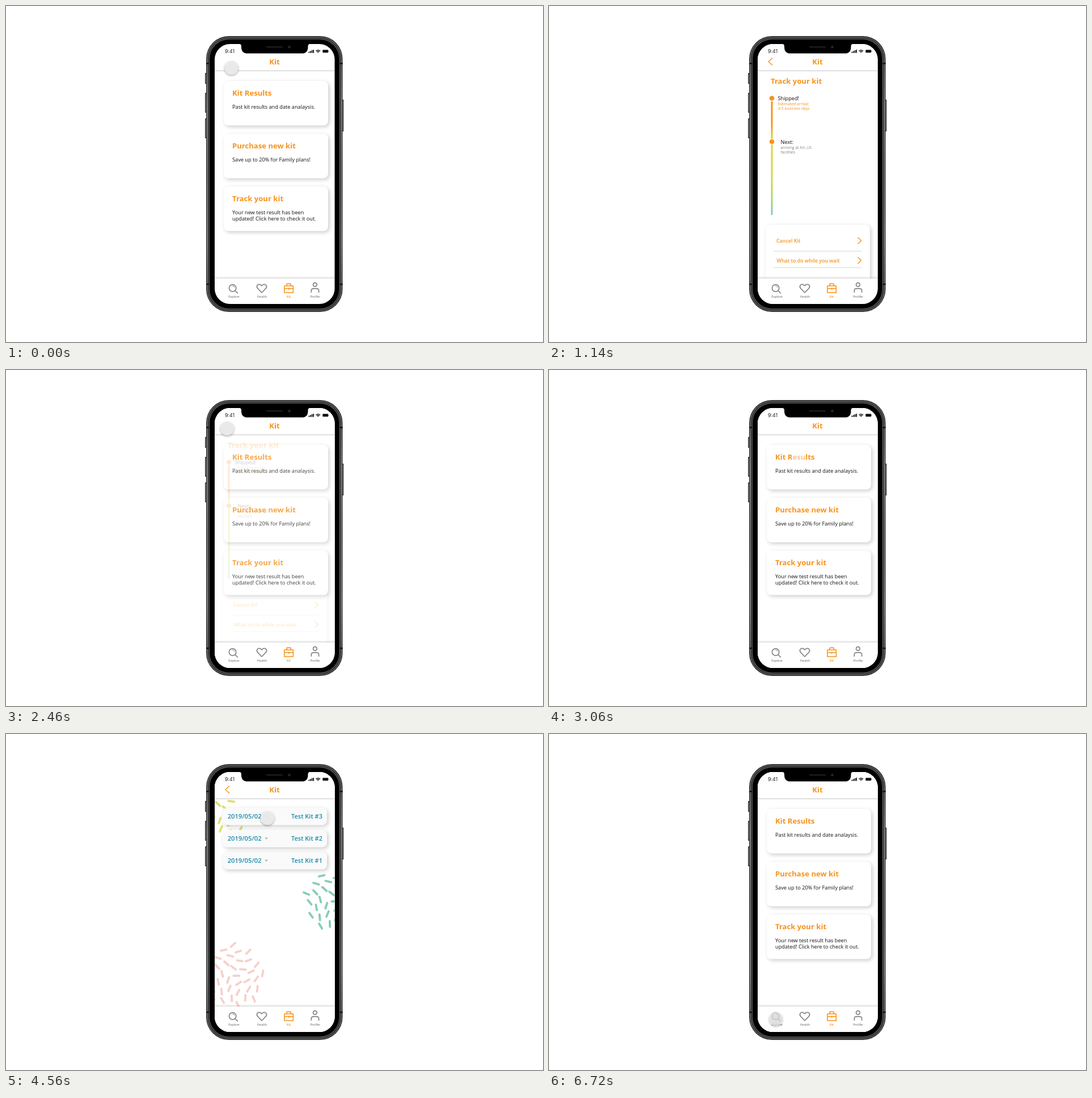
An HTML page with a canvas for the animation above (6.82 s loop, 947 by 592 pixels).

```html
<!DOCTYPE html>
<html lang="en">
<head>
<meta charset="utf-8">
<title>Kit app</title>
<style>
html, body { margin: 0; width: 100%; height: 100%; overflow: hidden; background: #fff; }
canvas { display: block; }
</style>
</head>
<body>
<canvas id="stage" width="947" height="592"></canvas>
<script>
(() => {
const W = 947, H = 592, LOOP = 6820, STEP = 60, LAST = 6720;
const ORANGE = '#f7931e', GRAY = '#858585', TEAL = '#2088a8', INK = '#111';
const FONT = '"Open Sans", "Noto Sans", sans-serif';
const stage = document.getElementById('stage').getContext('2d');
const clamp = v => Math.max(0, Math.min(1, v));

function layer(paint) {
  const c = document.createElement('canvas');
  c.width = W;
  c.height = H;
  paint(c.getContext('2d'));
  return c;
}

function box(g, x, y, r, b, radius, fill) {
  g.beginPath();
  g.roundRect(x, y, r - x, b - y, radius);
  g.fillStyle = fill;
  g.fill();
}

function line(g, pts, color, width) {
  g.beginPath();
  pts.forEach(([x, y]) => g.lineTo(x, y));
  g.strokeStyle = color;
  g.lineWidth = width;
  g.stroke();
}

function dot(g, x, y, r, fill) {
  g.beginPath();
  g.arc(x, y, r, 0, 7);
  g.fillStyle = fill;
  g.fill();
}

function text(g, str, x, y, size, color, weight = 400, align = 'left', family = FONT) {
  g.font = `${weight} ${size}px ${family}`;
  g.textAlign = align;
  g.fillStyle = color;
  g.fillText(str, x, y);
}

function shadow(g, color, blur, x, y) {
  g.shadowColor = color;
  g.shadowBlur = blur;
  g.shadowOffsetX = x;
  g.shadowOffsetY = y;
}

function card(g, x, y, r, b, fill = '#fff') {
  g.save();
  shadow(g, 'rgba(0,0,0,.2)', 7, 2.5, 2.5);
  box(g, x, y, r, b, 8, fill);
  g.restore();
}

function ramp(g, y0, y1, ...colors) {
  const grad = g.createLinearGradient(0, y0, 0, y1);
  colors.forEach((c, i) => grad.addColorStop(i / (colors.length - 1), c));
  return grad;
}

// Short strokes spread evenly over a disc in a sunflower spiral.
function confetti(g, cx, cy, count, color) {
  g.lineCap = 'round';
  for (let i = 0; i < count; i++) {
    const r = 9 * Math.sqrt(i + .5), turn = i * 2.4, tilt = i * 1.9;
    const x = cx + r * Math.cos(turn), y = cy + r * Math.sin(turn);
    const dx = 5 * Math.cos(tilt), dy = 5 * Math.sin(tilt);
    line(g, [[x - dx, y - dy], [x + dx, y + dy]], color, 3.8);
  }
  g.lineCap = 'butt';
}

function homeBody(g) {
  [['Kit Results', 'Past kit results and date analaysis.'],
   ['Purchase new kit', 'Save up to 20% for Family plans!'],
   ['Track your kit', 'Your new test result has been', 'updated! Click here to check it out.']
  ].forEach(([title, ...body], i) => {
    const y = 132 + i * 93;
    card(g, 384, y, 568, y + 78.5);
    text(g, title, 399, y + 25.5, 13.1, ORANGE, 700);
    body.forEach((s, n) => text(g, s, 399, y + 48.7 + n * 11, 9.2, INK));
  });
}

function trackBody(g) {
  text(g, 'Track your kit', 391, 137, 13.1, ORANGE, 700);
  line(g, [[393, 168], [393, 234]], ramp(g, 210, 234, ORANGE, '#e0d634'), 3);
  line(g, [[393, 244], [393, 368]], ramp(g, 244, 368, '#e0d634', '#d3dc3f', '#b9d860', '#7fcbc0'), 3);
  dot(g, 393, 162.5, 4.3, ORANGE);
  dot(g, 393, 239, 4.3, ORANGE);
  text(g, 'Shipped!', 403.5, 166.3, 9.2, INK);
  text(g, 'Estimated arrival:', 403.7, 175, 6.8, ORANGE);
  text(g, '4-5 business days', 403.7, 183.4, 6.8, ORANGE);
  text(g, 'Next:', 408.5, 243, 9.2, INK);
  text(g, 'arriving at NY, US', 408.5, 251.5, 6.8, GRAY);
  text(g, 'facilities', 408.5, 260, 6.8, GRAY);
  card(g, 382, 385.5, 566, 520);
  text(g, 'Cancel Kit', 401, 416.6, 8.9, ORANGE, 600);
  text(g, 'What to do while you wait', 401.5, 451.6, 8.9, ORANGE, 600);
  [[432, 413.5], [461, 448.3]].forEach(([y, mid]) => {
    line(g, [[396, y], [551.5, y]], '#d4d4d4', 1);
    line(g, [[544.5, mid - 6], [550.5, mid], [544.5, mid + 6]], ORANGE, 1.4);
  });
}

function resultsBody(g) {
  confetti(g, 385, 145, 18, '#dbe070');
  confetti(g, 573, 295, 30, '#88cdb2');
  confetti(g, 400, 426, 38, '#f8cfca');
  for (let i = 0; i < 3; i++) {
    const y = 130 + i * 39;
    card(g, 382, y, 566, y + 30.5, '#fafafa');
    text(g, '2019/05/02', 390.7, y + 19.3, 11.2, TEAL, 600);
    text(g, `Test Kit #${3 - i}`, 558, y + 19.3, 11, TEAL, 600, 'right');
    g.fillStyle = '#b5b5b5';
    g.fill(new Path2D(`M456.3 ${y + 13.5}h5.7l-2.9 3.5z`));
  }
}

function header(g, back) {
  g.save();
  shadow(g, 'rgba(0,0,0,.22)', 3, 0, 1);
  box(g, 360, 60, 590, 113, 0, '#fff');
  g.restore();
  text(g, 'Kit', 473.5, 102.6, 13.1, ORANGE, 700, 'center');
  if (back) line(g, [[394, 91.5], [387, 98], [394, 104.5]], ORANGE, 1.4);
  text(g, '9:41', 386, 82.6, 8.8, '#222', 400, 'left', 'Inter, "Liberation Sans", sans-serif');
  for (let i = 0; i < 4; i++) box(g, 533.5 + i * 2.6, 80.5 - i * 1.2, 535.3 + i * 2.6, 82.7, .4, '#111');
  g.strokeStyle = '#111';
  g.lineWidth = 1.3;
  for (let r = 1.3; r < 6; r += 2) {
    g.beginPath();
    g.arc(550.3, 83, r, -Math.PI * .75, -Math.PI * .25);
    g.stroke();
  }
  box(g, 558.3, 77.2, 568.3, 82.3, 1.2, '#111');
  box(g, 568.8, 78.8, 569.6, 80.7, .4, '#777');
}

function tabs(g) {
  g.save();
  shadow(g, 'rgba(0,0,0,.22)', 3, 0, -1);
  box(g, 360, 480, 590, 530, 0, '#fff');
  g.restore();
  const path = d => g.stroke(new Path2D(d));
  g.strokeStyle = GRAY;
  g.lineWidth = 1.7;
  g.lineCap = g.lineJoin = 'round';
  path('M405.8 497a6.2 6.2 0 1 1-12.4 0a6.2 6.2 0 1 1 12.4 0M404.2 501.6L408.4 506');
  path('M451 505L443.9 497.6C440.6 494 443.5 490.3 446.5 490.3C448.8 490.3 450 491.7 451 493C452 491.7 453.2 490.3 455.5 490.3C458.5 490.3 461.4 494 458.1 497.6Z');
  path('M548.2 491a3.3 3.3 0 1 1-6.6 0a3.3 3.3 0 1 1 6.6 0M538.4 504.2V501.5Q538.4 497.8 542.2 497.8H547.8Q551.6 497.8 551.6 501.5V504.2');
  g.lineWidth = .9;
  path('M399.5 493a4 4 0 0 1 3.6 3');
  g.strokeStyle = ORANGE;
  g.lineWidth = 1.6;
  g.lineJoin = 'miter';
  path('M491 493.2H506.4V505H491ZM495 492.5V490.6Q495 489.4 496.2 489.4H501.2Q502.4 489.4 502.4 490.6V492.5M491 497.8H506.4M498.7 497.8V499.6');
  g.lineCap = 'butt';
  [['Explore', 402], ['Health', 451.4], ['Kit', 498.6], ['Profile', 545]].forEach(([s, x]) =>
    text(g, s, x, 514, 5.4, s === 'Kit' ? ORANGE : GRAY, 600, 'center'));
}

const page = (body, back) => layer(g => {
  box(g, 360, 60, 590, 530, 0, '#fff');
  body(g);
  header(g, back);
  tabs(g);
});

function button(g, x, y, r, b) {
  box(g, x, y, r, b, 1, '#2b2b2b');
  box(g, x + 1, y + 1.5, r - 1, b - 1.5, .5, '#888');
}

function phone(g) {
  const metal = ramp(g, 53, 539, '#555', '#888', '#777', '#888', '#555');
  button(g, 351, 118, 355, 137);
  button(g, 351, 153, 355, 188);
  button(g, 351, 198, 355, 233);
  button(g, 592, 165, 595.4, 221);
  [[0, '#1b1b1b'], [1, metal], [3, '#2a2a2a'], [4.6, '#6a6a6a'], [5.6, '#111'], [7, '#000']]
    .forEach(([d, c]) => box(g, 353 + d, 53 + d, 593.6 - d, 539 - d, 40 - d, c));
  for (const x of [353, 588.6])
    for (const y of [100, 489]) box(g, x, y, x + 5, y + 2.5, 0, '#111');
}

function notch(g) {
  g.fillStyle = '#000';
  g.fill(new Path2D('M411 66.5H536.5Q532.5 67 532.5 71V72.5Q532.5 83.6 521.5 83.6H426Q415 83.6 415 72.5V71Q415 67 411 66.5Z'));
  box(g, 459, 71, 488, 73.4, 1.2, '#1c1c1e');
  dot(g, 499.5, 72.2, 2.6, '#17181d');
  dot(g, 499.5, 72.2, 1.2, '#30343f');
}

const home = page(homeBody, false);
const track = page(trackBody, true);
const results = page(resultsBody, true);
const phoneLayer = layer(phone);
const notchLayer = layer(notch);

// Dissolves: start time and the page reached.
const DISSOLVE = 300;
const CUTS = [[720, track], [2220, home], [3120, results], [5040, home]];

// Pointer trips: it fades in at show, passes the stops [time, x, y], fades out at hide.
const FADE = 120;
const TRIPS = [
  { show: -FADE, hide: 720, stops: [[60, 397.5, 109], [240, 458, 325], [480, 458, 325], [600, 451, 315]] },
  { show: 1440, hide: 3000, stops: [[1500, 459, 524], [2100, 390, 103], [2580, 390, 103], [2940, 440, 152]] },
  { show: 3420, hide: 5910, stops: [[3480, 461, 524], [4380, 461, 148], [4620, 461, 148], [4980, 395, 100],
    [5700, 395, 100], [5940, 508, 524]] },
  { show: 6120, hide: 6690, stops: [[6240, 498, 168], [6600, 400, 502]] }
];

function pointerAt(t) {
  const { show, hide, stops } = TRIPS.findLast(trip => trip.show <= t);
  const alpha = Math.min(clamp((t - show) / FADE), clamp(1 - (t - hide) / FADE));
  let [, x, y] = stops[0];
  for (let i = 1; i < stops.length; i++) {
    const [from] = stops[i - 1], [to, nx, ny] = stops[i];
    const e = 1 - (1 - clamp((t - from) / (to - from))) ** 3;
    x += (nx - x) * e;
    y += (ny - y) * e;
  }
  return { x, y, alpha };
}

function drawPointer(g, t) {
  const { x, y, alpha } = pointerAt(t);
  if (!alpha) return;
  const solid = clamp((alpha - .5) * 4);
  const shade = Math.round(255 - 19 * solid);
  g.save();
  g.globalAlpha = alpha * .95;
  shadow(g, `rgba(0,0,0,${.32 * solid})`, 3.5, 0, 1.5);
  dot(g, x, y, 12.3, `rgb(${shade},${shade},${shade})`);
  g.restore();
}

function draw(t) {
  const g = stage;
  g.fillStyle = '#fff';
  g.fillRect(0, 0, W, H);
  g.drawImage(phoneLayer, 0, 0);
  g.save();
  g.beginPath();
  g.roundRect(368, 67, 211.6, 458, 27);
  g.clip();
  g.drawImage(home, 0, 0);
  CUTS.forEach(([start, target]) => {
    g.globalAlpha = clamp((t - start) / DISSOLVE);
    g.drawImage(target, 0, 0);
  });
  g.restore();
  g.drawImage(notchLayer, 0, 0);
  drawPointer(g, t);
}

const begin = performance.now();
function tick() {
  const t = (performance.now() - begin) % LOOP;
  draw(Math.min(LAST, Math.floor(t / STEP) * STEP));
  requestAnimationFrame(tick);
}
tick();
})();
</script>
</body>
</html>
```
